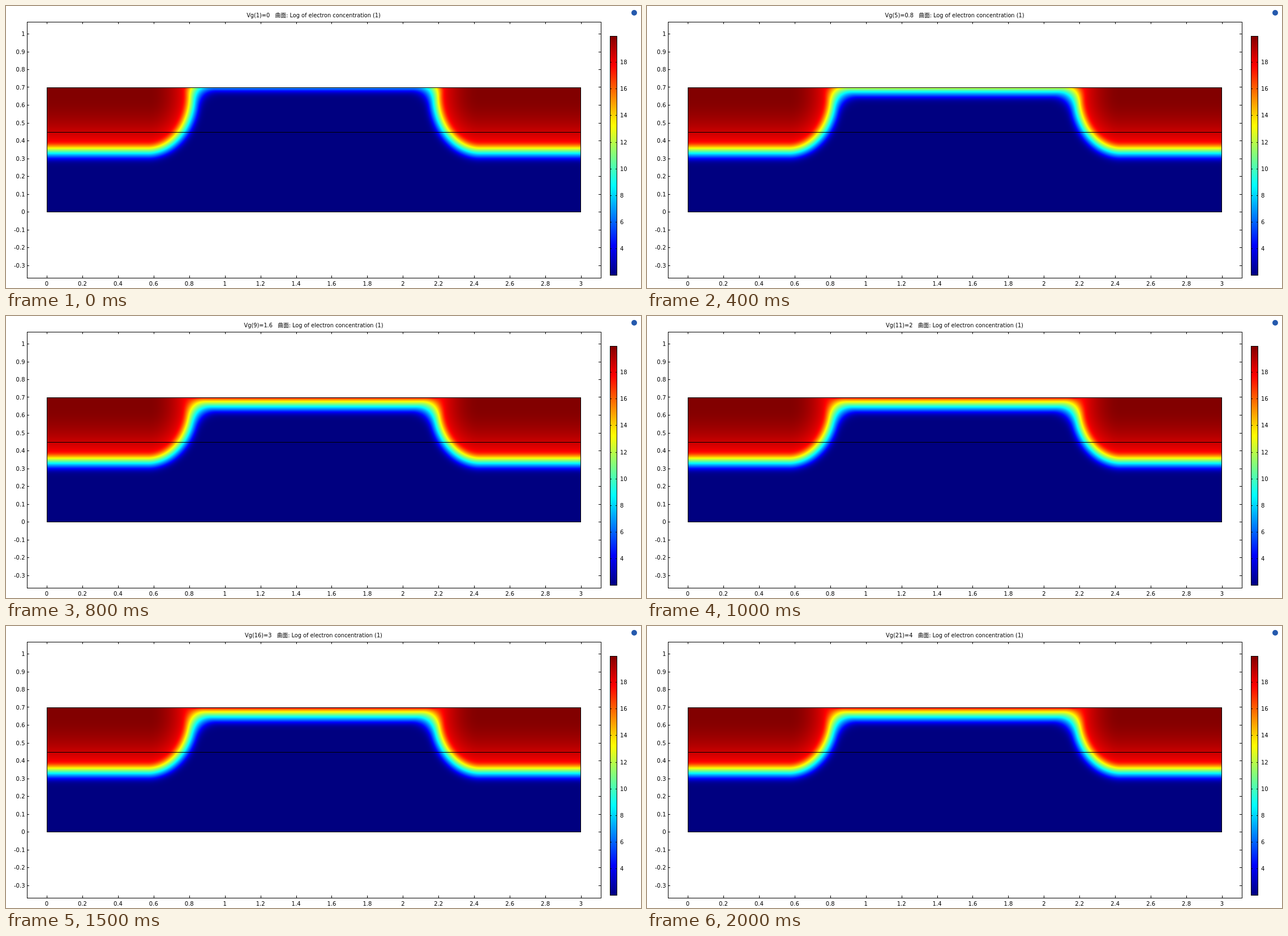
Recreate the animation shown at these times as an HTML page with a canvas. Size 1122x499 px, loop 2100 ms.

```html
<!DOCTYPE html>
<html lang="en">
<head>
<meta charset="utf-8">
<title>Electron concentration</title>
<style>
  html, body { margin: 0; width: 100%; height: 100%; overflow: hidden; background: #fff; }
  canvas { display: block; }
</style>
</head>
<body>
<canvas id="stage" width="1122" height="499"></canvas>
<script>
const ctx = document.getElementById('stage').getContext('2d');
const STEP_MS = 100, STEPS = 21;
const FIELD = { x: 72, y: 144, w: 944, h: 220 };
const FAMILY = '"DejaVu Sans", "Noto Sans CJK SC", "Noto Sans CJK JP", sans-serif';

const clamp = (v, lo, hi) => Math.min(hi, Math.max(lo, v));
const toX = x => 72 + x * 314.67;
const toY = y => 364 - y * 315;
const barY = v => 476 - (v - 2) * 23.55;

// Rainbow scale running from 2 (navy) to 20 (dark red)
function rainbow(v) {
  const t = (v - 2) / 18 * 4;
  return [3, 2, 1].map(c => Math.round(255 * clamp(1.5 - Math.abs(t - c), 0, 1)));
}
const palette = Array.from({ length: 1025 }, (_, i) => rainbow(2 + 18 * i / 1024));

const softMin = (a, b, w) => a - w * Math.log1p(Math.exp((a - b) / w));

// Log concentration at pixel offset (x, y) inside the left half of the device
function makeField(vg) {
  const surface = softMin(7 + 6.8 * vg, 16.7 + 0.08 * vg, 0.7);
  const channelDepth = (surface - 13.25) / 0.5;
  const inversion = Math.max(0, surface - 15) * 0.8 + 0.08 * vg;
  const A = 74, B = 95, BLEND = 30;

  return (x, y) => {
    const dx = Math.max(0, x - 178) / A;
    const dy = Math.max(0, y - 12) / B;
    const r = Math.hypot(dx, dy) || 1e-6;
    const junction = (r - 1) * r / Math.hypot(dx / A, dy / B);
    const channel = y - channelDepth;
    const overlap = Math.max(0, BLEND - Math.abs(junction - channel));
    const dist = Math.min(junction, channel) - overlap * overlap / (4 * BLEND);

    const doping = Math.max(19.95 - 2.6 * r * r, 17.4);
    const level = softMin(doping, 13.25 - 0.5 * dist, 1) - 2;
    const sheet = inversion * Math.exp(-y / 2) * clamp((junction + 10) / 20, 0, 1);
    return 2 + 1.5 * Math.log1p(Math.exp(level / 1.5)) + sheet;
  };
}

const fieldCache = [];
function fieldImage(step) {
  if (fieldCache[step]) return fieldCache[step];
  const { w, h } = FIELD;
  const image = ctx.createImageData(w, h);
  const valueAt = makeField(step * 0.2);
  for (let y = 0; y < h; y++) {
    for (let x = 0; x < w / 2; x++) {
      const index = Math.round((valueAt(x, y) - 2) / 18 * 1024);
      const [r, g, b] = palette[clamp(index, 0, 1024)];
      for (const column of [x, w - 1 - x]) {
        const p = (y * w + column) * 4;
        image.data[p] = r;
        image.data[p + 1] = g;
        image.data[p + 2] = b;
        image.data[p + 3] = 255;
      }
    }
  }
  return fieldCache[step] = image;
}

function text(str, x, y, align, size = 10) {
  ctx.font = `${size}px ${FAMILY}`;
  ctx.textAlign = align;
  ctx.fillText(str, x, y);
}
const hLine = (x, y, w) => ctx.fillRect(Math.round(x), Math.round(y), w, 1);
const vLine = (x, y, h) => ctx.fillRect(Math.round(x), Math.round(y), 1, h);
const outline = (x, y, w, h) => ctx.strokeRect(x + 0.5, y + 0.5, w, h);
const label = v => String(+v.toFixed(1));

function drawAxes() {
  outline(37, 28, 1014, 453);
  for (let i = 0; i <= 15; i++) {
    const x = toX(i * 0.2);
    vLine(x, 28, 4);
    vLine(x, 477, 4);
    text(label(i * 0.2), x, 495, 'center');
  }
  for (let i = -3; i <= 10; i++) {
    const y = toY(i * 0.1);
    hLine(37, y, 4);
    hLine(1047, y, 4);
    text(label(i * 0.1), 33.5, y + 4, 'right');
  }
}

function drawColorBar() {
  for (let y = 53; y < 477; y++) {
    ctx.fillStyle = `rgb(${rainbow(2 + (476 - y) / 23.55)})`;
    ctx.fillRect(1067, y, 12, 1);
  }
  ctx.fillStyle = '#000';
  outline(1067, 53, 12, 423);
  for (let v = 4; v <= 18; v += 2) {
    const y = barY(v);
    hLine(1068, y, 2);
    hLine(1077, y, 2);
    text(String(v), 1085, y + 4, 'left');
  }
}

function draw(step) {
  ctx.fillStyle = '#fff';
  ctx.fillRect(0, 0, 1122, 499);
  ctx.fillStyle = ctx.strokeStyle = '#000';
  ctx.lineWidth = 1;
  text(`Vg(${step + 1})=${label(step * 0.2)}   曲面: Log of electron concentration (1)`,
    543.5, 20, 'center', 9.75);
  drawAxes();
  ctx.putImageData(fieldImage(step), FIELD.x, FIELD.y);
  outline(FIELD.x - 1 + 1, FIELD.y, FIELD.w - 1, FIELD.h);
  hLine(FIELD.x, 223, FIELD.w);
  drawColorBar();
  ctx.fillStyle = '#2459ad';
  ctx.beginPath();
  ctx.arc(1110, 12, 5, 0, Math.PI * 2);
  ctx.fill();
}

let shown = -1;
function tick() {
  const step = Math.floor(performance.now() / STEP_MS) % STEPS;
  if (step !== shown) draw(shown = step);
  requestAnimationFrame(tick);
}
tick();
</script>
</body>
</html>
```
